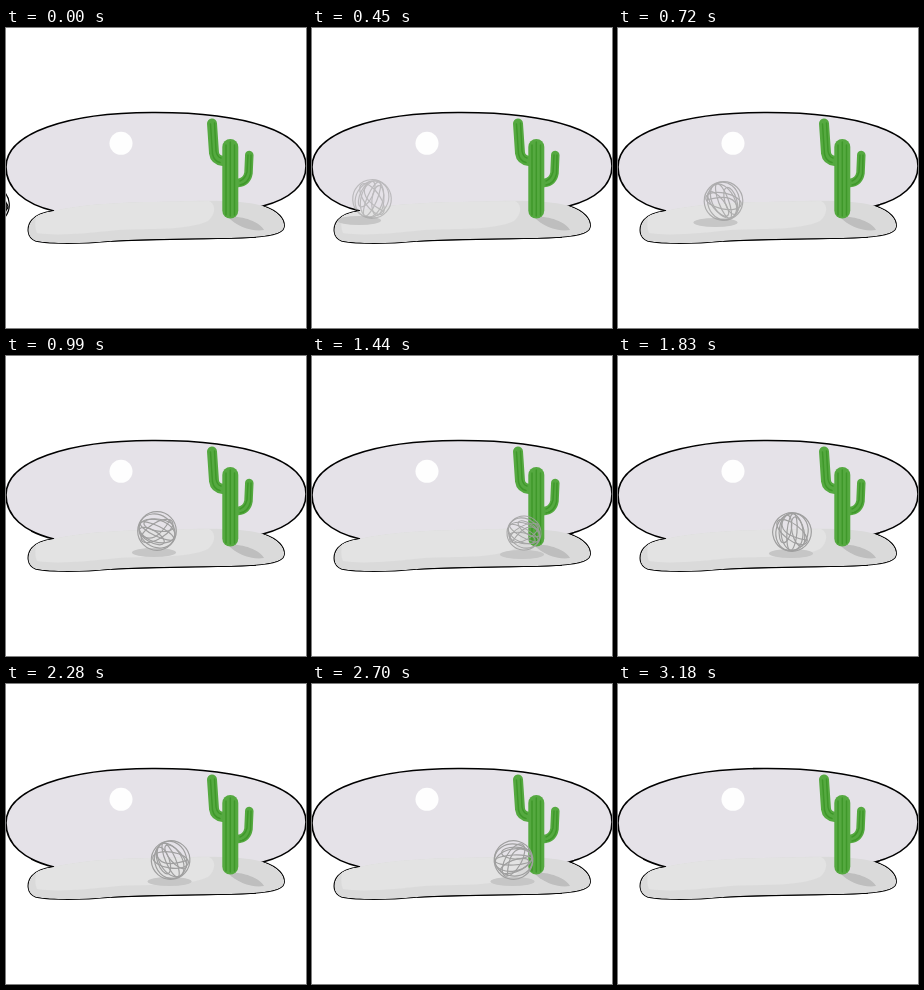
Recreate the animation shown at these times as an HTML page without scripts. Size 300 by 300 pixels, loop 4140 ms.

```html
<!DOCTYPE html>
<html lang="en">
<head>
<meta charset="utf-8">
<title>Tumbleweed</title>
<style>
@property --x { syntax: "<number>"; inherits: true; initial-value: -16; }
@property --y { syntax: "<number>"; inherits: true; initial-value: 177; }
@property --lag { syntax: "<number>"; inherits: true; initial-value: 0; }
@property --fade { syntax: "<number>"; inherits: true; initial-value: 1; }
@property --size { syntax: "<number>"; inherits: true; initial-value: 1; }

html, body { margin: 0; width: 100%; height: 100%; overflow: hidden; background: #fff; }
svg { display: block; width: 100vw; height: 100vh; animation: drift 4140ms infinite; }

.weed {
  transform: translate(calc(var(--x) * 1px), calc(var(--y) * 1px))
    rotate(calc((var(--x) - 151) * 3deg)) scale(var(--size));
}
.grey { stroke: #9f9f9f; opacity: var(--fade); }
.dark { stroke: #000; }
.shade {
  transform: translate(calc((var(--x) - var(--lag)) * 1px), calc(var(--y) * 1px + 21.5px));
}

/* the weed rolls in, is pushed back by the cactus, then leaves to the right */
@keyframes drift {
  0%       { --x: -16; --y: 177; --lag: 18; --fade: .5; --size: 1; animation-timing-function: steps(15); }
  10.8695% { --x: 60;  --y: 171; --lag: 13; --fade: .6; --size: 1; animation-timing-function: steps(18); }
  23.9130% { --x: 151; --y: 175; --lag: 3; --fade: 1; --size: 1; animation-timing-function: steps(8); }
  29.7101% { --x: 189; --y: 176; --lag: 3; --fade: 1; --size: .94; animation-timing-function: steps(4); }
  32.6086% { --x: 204; --y: 177; --lag: 2; --fade: .95; --size: .9; animation-timing-function: steps(3); }
  34.7826% { --x: 212; --y: 177; --lag: 2; --fade: .9; --size: .88; animation-timing-function: steps(3); }
  36.9565% { --x: 210; --y: 177; --lag: 2; --fade: .95; --size: .91; animation-timing-function: steps(3); }
  39.1304% { --x: 202; --y: 177; --lag: 1; --fade: 1; --size: .95; animation-timing-function: steps(3); }
  41.3043% { --x: 190; --y: 176; --lag: 1; --fade: 1; --size: 1; animation-timing-function: steps(4); }
  44.2028% { --x: 174; --y: 176; --lag: 1; --fade: 1; --size: 1; animation-timing-function: steps(4); }
  47.1014% { --x: 165; --y: 176; animation-timing-function: steps(5); }
  50.7246% { --x: 161; --y: 176; animation-timing-function: steps(5); }
  54.3478% { --x: 163; --y: 176; animation-timing-function: steps(5); }
  57.9710% { --x: 171; --y: 176; animation-timing-function: steps(5); }
  61.5942% { --x: 184; --y: 176; animation-timing-function: steps(5); }
  65.2173% { --x: 201.5; --y: 176; animation-timing-function: steps(5); }
  68.8405% { --x: 227; --y: 175; animation-timing-function: steps(5); }
  72.4637% { --x: 264; --y: 174; animation-timing-function: steps(6); }
  76.8115%, 100% { --x: 330; --y: 173; --lag: 1; --fade: 1; --size: 1; }
}
</style>
</head>
<body>
<svg viewBox="0 0 300 300">
  <defs>
    <path id="edge" d="M48 183C18 176 0 160 0 139C0 105 62 84.500 146 84.500C240 84 300 104 300 138C300 157 284 171 257 178C272 183 279 191 278 199C277 206 262 208.500 240 209.500C200 211 150 210 105 213C75 216 45 216 30 213C20 209 21 198 26 192C31 186 40 184 48 183Z"/>
    <path id="land" d="M48 183C80 175 130 174 170 173.500C210 172 240 173 257 178C272 183 279 191 278 199C277 206 262 208.500 240 209.500C200 211 150 210 105 213C75 216 45 216 30 213C20 209 21 198 26 192C31 186 40 184 48 183Z"/>
    <clipPath id="inside"><use href="#edge"/></clipPath>
    <clipPath id="onland"><use href="#land"/></clipPath>
    <g id="ball" fill="none" stroke-width="1.200">
      <circle r="19.300"/>
      <ellipse rx="19" ry="16" transform="rotate(35)"/>
      <ellipse rx="18.500" ry="11" transform="rotate(18)"/>
      <ellipse rx="18.500" ry="5" transform="rotate(26)"/>
      <ellipse rx="18" ry="8" transform="rotate(-32)"/>
      <ellipse cx="1" cy="-6" rx="15" ry="6" transform="rotate(8)"/>
      <ellipse cx="-2" cy="7" rx="14" ry="6" transform="rotate(30)"/>
      <path d="M-17 3Q-3 16 13-11"/>
    </g>
  </defs>

  <use href="#ball" class="weed dark"/>
  <use href="#edge" fill="#e5e2e8" stroke="#000" stroke-width="1.600"/>
  <path d="M105 212.500C150 210 200 211 250 208.500" fill="none" stroke="#000" stroke-width="2.400"/>

  <g clip-path="url(#inside)">
    <circle cx="115" cy="115.300" r="11.500" fill="#fefefe"/>
    <use href="#land" fill="#dadada"/>
    <path clip-path="url(#onland)" fill="#e3e3e3" d="M33 178H48C90 172 150 174 203 173C211 177 209 187 202 193C180 203 145 200 112 202C75 206 50 208 31 205C28 198 29 188 33 178Z"/>
    <path fill="#bebebe" d="M222 189C236 187 254 194 258 202C247 204 231 199 222 189Z"/>
    <g clip-path="url(#onland)">
      <ellipse class="shade" rx="22" ry="4.500" fill="#c6c6c6"/>
    </g>

    <g fill="none" stroke-linecap="round">
      <g stroke="#55a940">
        <path stroke-width="10" d="M206 95.500L208 125Q209 132 217 133"/>
        <path stroke-width="8.500" d="M243.300 127L242.500 145Q241 154 232 155"/>
        <path stroke-width="16" d="M224.300 119V182.500"/>
      </g>
      <g stroke="#3f982a" stroke-width="1.500">
        <path d="M204.500 96L206.500 126Q208 133 214 134.500M208.500 95L210 123Q211 129 215 130"/>
        <path d="M242 127L241 144Q239 151 234 153M245 127L244.500 146Q242 156 234 157"/>
        <path d="M220 117V187M224.300 114V188M228.500 117V187"/>
      </g>
    </g>

    <use href="#ball" class="weed grey"/>
  </g>
</svg>
</body>
</html>
```
